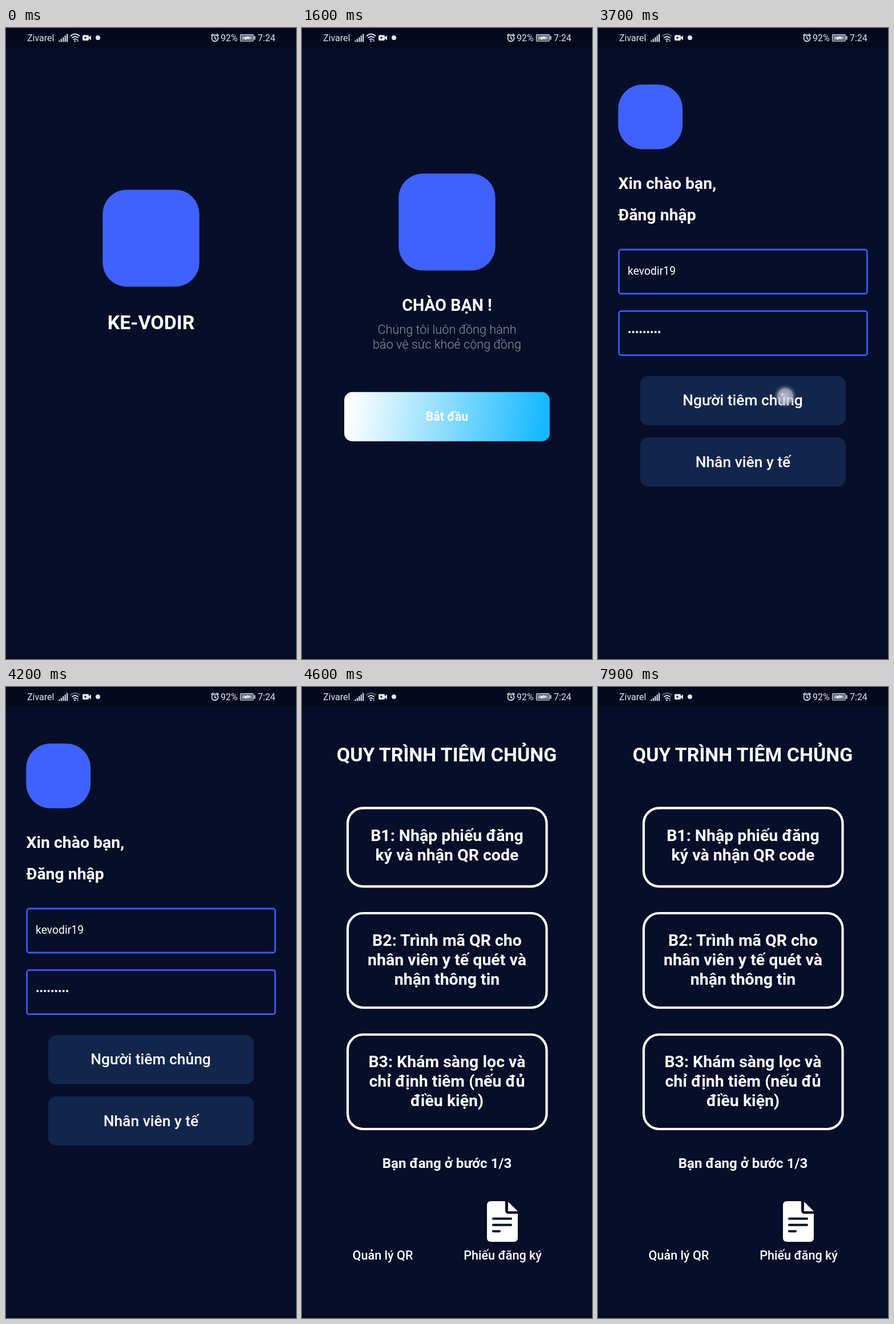
An HTML page for the animation above (8 s loop, 508 px wide and 1102 px high).

```html
<!DOCTYPE html>
<html lang="vi">
<head>
<meta charset="utf-8">
<style>
html, body { margin: 0; width: 100%; height: 100%; overflow: hidden; background: #060e29; }
svg { display: block; width: 508px; height: 1102px; font-family: Roboto, "Noto Sans", sans-serif; }
text { fill: #fff; white-space: pre; }
.mid { text-anchor: middle; }
.bold { font-weight: 700; }
.med { font-weight: 500; }
.light { font-weight: 300; fill: #8f929f; }
.bg { fill: #060e29; }
.tile { fill: #3f62ff; }
.field { fill: none; stroke: #3c5af6; stroke-width: 2.8; }
.btn { fill: #12264c; }
.step { fill: none; stroke: #fff; stroke-width: 4.2; }
#status { fill: #e4e6ed; stroke: none; }
#status text { fill: #e4e6ed; font-size: 16px; }
#status .line { fill: none; stroke: #e4e6ed; stroke-width: 1.7; stroke-linecap: round; }
</style>
</head>
<body>
<svg viewBox="0 0 508 1102">
  <defs>
    <linearGradient id="sky" gradientUnits="userSpaceOnUse" x1="82" y1="655" x2="426" y2="703">
      <stop offset="0" stop-color="#fff"/>
      <stop offset="1" stop-color="#14b8ff"/>
    </linearGradient>
    <radialGradient id="glow">
      <stop offset="0" stop-color="#e4e5ee" stop-opacity=".8"/>
      <stop offset=".62" stop-color="#b9bdcb" stop-opacity=".75"/>
      <stop offset=".76" stop-color="#8d94ae" stop-opacity=".38"/>
      <stop offset="1" stop-color="#6d7694" stop-opacity="0"/>
    </radialGradient>
  </defs>

  <g id="splash">
    <rect class="bg" width="508" height="1102"/>
    <rect class="tile" x="169.3" y="282.4" width="169.4" height="169.4" rx="42.3"/>
  </g>
  <g id="welcome">
    <rect class="bg" width="508" height="1102"/>
    <rect class="tile" x="169.3" y="254.2" width="169.4" height="169.4" rx="42.3"/>
    <rect x="74" y="635.8" width="360" height="86" rx="14.1" fill="url(#sky)"/>
  </g>
  <g id="login">
    <rect class="bg" width="508" height="1102"/>
    <rect class="tile" x="35.3" y="98.8" width="112.9" height="112.9" rx="42.3"/>
    <rect class="field" x="36.7" y="387" width="434.8" height="77" rx="4"/>
    <rect class="field" x="36.7" y="494.4" width="434.8" height="77" rx="4"/>
    <rect class="btn" x="74" y="607.8" width="360" height="86" rx="14.1"/>
    <rect class="btn" x="74" y="715" width="360" height="86" rx="14.1"/>
  </g>
  <g id="process">
    <rect class="bg" width="508" height="1102"/>
    <rect class="step" x="80" y="211.3" width="348.5" height="137" rx="27"/>
    <rect class="step" x="80" y="395" width="348.5" height="165" rx="27"/>
    <rect class="step" x="80" y="607" width="348.5" height="165" rx="27"/>
    <g id="form" fill="#fff">
      <path d="M331 898H356V914Q356 920 362 920H378V962Q378 969 371 969H331Q324 969 324 962V905Q324 898 331 898Z"/>
      <path d="M361 899L378 915.5H361Z"/>
      <path d="M335 928.5H366M335 939.5H366M335 950.5H346" stroke="#060e29" stroke-width="4" stroke-linecap="round"/>
    </g>
  </g>

  <circle id="touch" r="20.5" fill="url(#glow)"/>

  <rect y="1098" width="508" height="4" fill="#040a20"/>
  <rect width="508" height="34.5" fill="#040920"/>
  <g id="status">
    <g id="bars"></g>
    <path id="outer" class="line" d="M113.3 14Q121 7 128.7 14"/>
    <path class="line" d="M115.8 17.2Q121 12.8 126.2 17.2M118.2 20.2Q121 18 123.6 20.2"/>
    <circle cx="120.6" cy="23" r="1.4"/>
    <path d="M124 21.5l1.5-2 1.5 2zM124 22.5h3l-1.5 2z"/>
    <rect x="134" y="12.3" width="11" height="9.6" rx="2"/>
    <path d="M145 16L149 13V21.3L145 18.5Z"/>
    <circle cx="139" cy="17" r="1.6" fill="#040920"/>
    <circle cx="161" cy="17" r="4"/>
    <circle class="line" cx="366" cy="17.7" r="5.6"/>
    <path class="line" d="M366 14.7V18L368.2 19.6M359.8 13L362.6 10.6M372.2 13L369.4 10.6"/>
    <rect x="410.7" y="11.7" width="22.6" height="11.2" rx="1.6" fill="none" stroke="#e4e6ed" stroke-width="1.4"/>
    <rect x="412.4" y="13.4" width="19.2" height="7.8" fill="#8b8f9c"/>
    <path d="M414.5 17.2L421 15.4L421.6 16.6L422.4 14L429.5 17.4L423.2 19L422.5 17.9L421.3 20.4Z"/>
    <rect x="434.6" y="14" width="2" height="6.6" rx="1"/>
  </g>
</svg>
<script>
const LOOP = 8000;
const $ = id => document.getElementById(id);

function add(parent, tag, attrs, content = '') {
  const el = document.createElementNS('http://www.w3.org/2000/svg', tag);
  for (const key in attrs) el.setAttribute(key, attrs[key]);
  el.textContent = content;
  $(parent).append(el);
}

// x, baseline, size, class, then lines spaced by the given pitch
function label(parent, x, y, size, cls, lines, pitch = 34) {
  [].concat(lines).forEach((line, i) =>
    add(parent, 'text', { x, y: y + i * pitch, 'font-size': size, class: cls }, line));
}

label('splash', 254, 525.5, 33.9, 'mid bold', 'KE-VODIR');

label('welcome', 254, 493.5, 28.6, 'mid bold', 'CHÀO BẠN !');
label('welcome', 254, 534, 21.65, 'mid light',
  ['Chúng tôi luôn đồng hành', 'bảo vệ sức khoẻ cộng đồng'], 25.6);
label('welcome', 254, 686, 21.4, 'mid bold', 'Bắt đầu');

label('login', 35.5, 281, 28.4, 'bold', 'Xin chào bạn,');
label('login', 35.5, 336, 28.4, 'bold', 'Đăng nhập');
label('login', 52, 431, 19.4, '', 'kevodir19');
for (let i = 0; i < 9; i++)
  add('login', 'circle', { cx: 55.2 + i * 6.5, cy: 531, r: 2.1, fill: '#fff' });
label('login', 253.5, 659, 26.4, 'mid med', 'Người tiêm chủng');
label('login', 254, 766.5, 26.4, 'mid med', 'Nhân viên y tế');

label('process', 253.5, 130, 33.9, 'mid bold', 'QUY TRÌNH TIÊM CHỦNG');
label('process', 254, 268.5, 28.5, 'mid bold', ['B1: Nhập phiếu đăng', 'ký và nhận QR code']);
label('process', 254, 452, 28.5, 'mid bold',
  ['B2: Trình mã QR cho', 'nhân viên y tế quét và', 'nhận thông tin']);
label('process', 254, 664, 28.5, 'mid bold',
  ['B3: Khám sàng lọc và', 'chỉ định tiêm (nếu đủ', 'điều kiện)']);
label('process', 254, 839.5, 24.1, 'mid bold', 'Bạn đang ở bước 1/3');
label('process', 141.5, 1000, 21.6, 'mid med', 'Quản lý QR');
label('process', 351.5, 1000, 21.6, 'mid med', 'Phiếu đăng ký');

label('status', 37, 23.2, 16, '', 'Zivarel');
label('status', 376, 23.2, 16, '', '92%');
label('status', 441, 23.2, 16, '', '7:24');
for (let i = 0; i < 5; i++) {
  const height = 3 + i * 2.8;
  add('bars', 'rect', { x: 92.5 + i * 3.4, y: 24.5 - height, width: 2.1, height, rx: 0.8 });
}

// Each screen rises into place while fading in over the one before
const entries = [
  { id: 'welcome', start: 1110, span: 150 },
  { id: 'login', start: 2510, span: 150 },
  { id: 'process', start: 4296, span: 350 }
];
const taps = [
  { at: 1900, x: 300, y: 690 },
  { at: 3600, x: 328, y: 643 },
  { at: 7400, x: 352, y: 958 }
];
const clamp = v => Math.min(1, Math.max(0, v));

function fade(p) {
  if (p < 0.5) return p / 2;
  if (p < 0.9) return 0.25 + (p - 0.5) * 1.125;
  return 0.7 + (p - 0.9) * 3;
}

function draw(t) {
  for (const { id, start, span } of entries) {
    const p = 1 - (1 - clamp((t - start) / span)) ** 5;
    const el = $(id);
    el.style.display = p > 0 ? '' : 'none';
    el.setAttribute('opacity', fade(p));
    el.setAttribute('transform', `translate(0 ${(1 - p) * 88})`);
  }
  $('form').style.display = t < 4450 ? 'none' : '';
  $('outer').setAttribute('opacity', t < 1900 ? 1 : 0.45);

  const tap = taps.find(({ at }) => t >= at && t < at + 300);
  const touch = $('touch');
  touch.style.display = tap ? '' : 'none';
  if (tap) {
    touch.setAttribute('cx', tap.x);
    touch.setAttribute('cy', tap.y);
    touch.setAttribute('opacity', clamp((tap.at + 300 - t) / 120));
  }
}

const begin = performance.now();
function tick() {
  draw((performance.now() - begin) % LOOP);
  requestAnimationFrame(tick);
}
tick();
</script>
</body>
</html>
```
